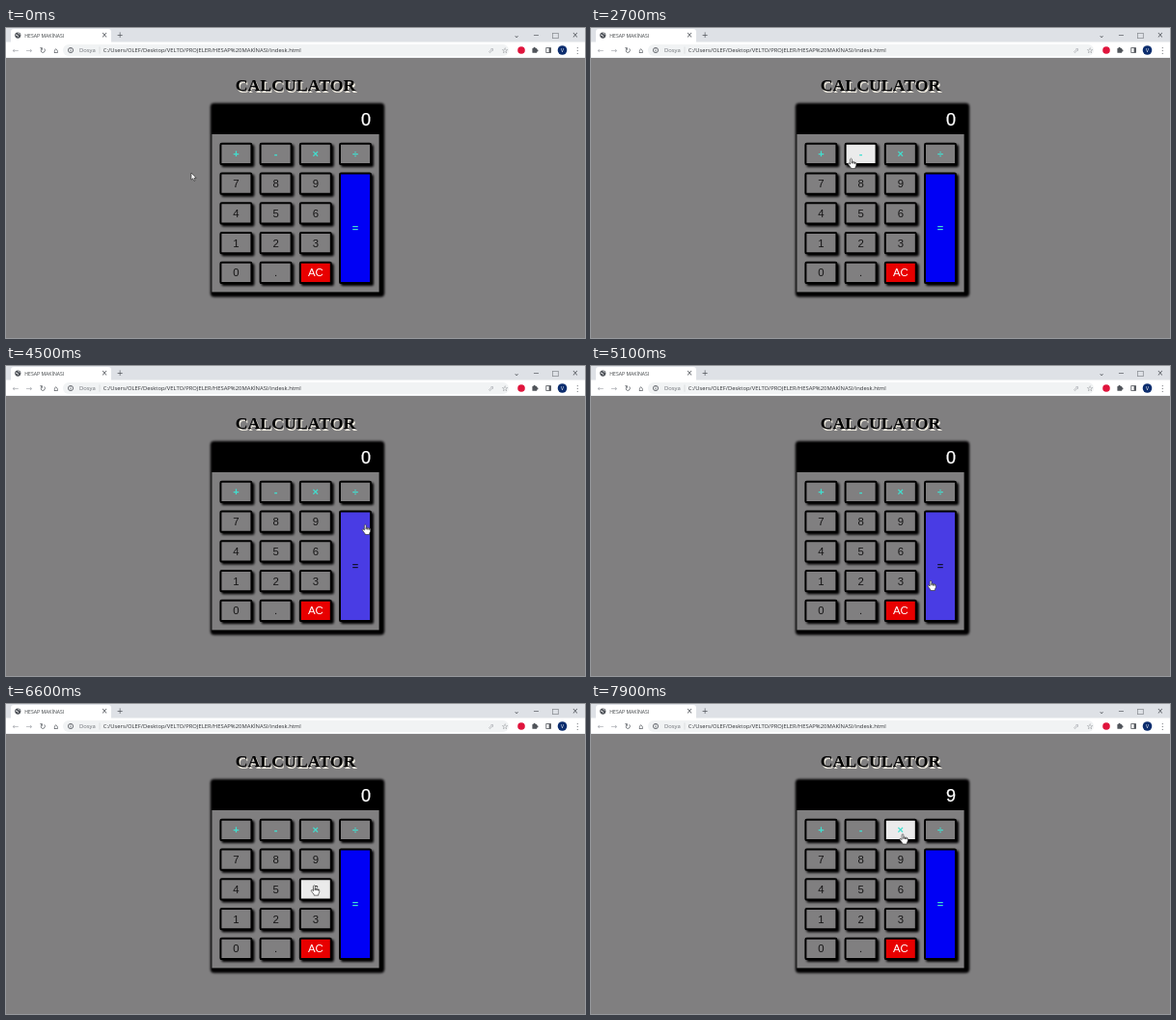
Write an HTML page that moves like this. It is 600 px wide and 321 px high and loops after 8000 ms.

```html
<!DOCTYPE html>
<html lang="tr">
<head>
<meta charset="utf-8">
<title>Calculator</title>
<style>
  html, body { margin: 0; width: 100%; height: 100%; overflow: hidden; background: #807f80; }
  svg { display: block; }
  text { font-family: "Liberation Sans", Arial, sans-serif; }
  .ui text { font: 5.87px "Open Sans", sans-serif; fill: #3c4043; }
  .ui .icon { font: 8px "DejaVu Sans", sans-serif; fill: #50545a; text-anchor: middle; dominant-baseline: central; }
  .ui .pale { fill: #a8abb0; }
  .key rect { stroke: #000; stroke-width: 2; filter: drop-shadow(2.8px 2.8px 1.1px #000); }
  .key text { font-size: 11.4px; text-anchor: middle; }
  .title { font: bold 17.75px "Liberation Serif", serif; text-anchor: middle; text-shadow: 1.2px 1.2px .4px #f0ece0; }
</style>
</head>
<body>
<svg width="600" height="321" viewBox="0 0 600 321">
  <rect width="600" height="321" fill="#807f80"/>
  <g class="ui" id="browser">
    <rect width="600" height="31" fill="#dee1e6"/>
    <rect y="14.5" width="600" height="16" fill="#fff"/>
    <rect x="5" y="1" width="104" height="20" rx="3" fill="#fff"/>
    <circle cx="12.3" cy="7.6" r="3.1" fill="#50545a"/>
    <path d="M10 7l2 .6 .6 1.6M12.4 5.2l2 1.2" fill="none" stroke="#fff" stroke-width=".8"/>
    <text x="19.3" y="9.7" style="font-size:5.15px">HESAP MAKİNASI</text>
    <rect x="59" y="17" width="462" height="12" rx="6" fill="#f1f3f4"/>
    <text x="76" y="25.2" style="fill:#6a6e73">Dosya</text>
    <text x="100.8" y="25.2" style="fill:#303236">C:/Users/OLEF/Desktop/VELTO/PROJELER/HESAP%20MAKİNASI/indesk.html</text>
    <path d="M97 19.5v7" stroke="#c4c7ca" stroke-width=".5"/>
    <circle cx="67" cy="23" r="2.6" fill="none" stroke="#50545a" stroke-width=".8"/>
    <path d="M67 22.6v1.8m0-3.1v.7" stroke="#50545a" stroke-width=".8"/>
    <circle cx="534" cy="23" r="3.8" fill="#e0143c"/>
    <rect x="545.4" y="21" width="4.8" height="4.8" rx=".6" fill="#50545a"/>
    <circle cx="547.6" cy="20.8" r="1.1" fill="#50545a"/>
    <circle cx="550.4" cy="23.4" r="1.1" fill="#50545a"/>
    <rect x="559.8" y="20.6" width="4.8" height="4.8" fill="none" stroke="#50545a" stroke-width=".8"/>
    <rect x="562.6" y="20.6" width="2" height="4.8" fill="#50545a"/>
    <circle cx="576.5" cy="23" r="4.8" fill="#0c2d6e"/>
    <text x="576.5" y="25" text-anchor="middle" style="fill:#fff;font-size:5px">V</text>
  </g>
  <text class="title" x="300" y="65.4">CALCULATOR</text>
  <rect x="211.8" y="77.8" width="180.4" height="200.8" rx="4" style="filter:blur(.9px)"/>
  <rect x="213.4" y="110" width="173.2" height="163.4" fill="#807f80"/>
  <text id="display" x="378" y="100.8" text-anchor="end" fill="#fff" stroke="#fff" stroke-width=".25" font-size="18">0</text>
  <g id="keys"></g>
  <path id="arrow" d="M0 0V7.2L1.7 5.7 2.9 8.3 4 7.8 2.9 5.3H5.1Z" fill="#fff" stroke="#000" stroke-width=".5"/>
  <path id="hand" d="M-.9 6V.8Q0-.5 .9 .8V5.2 3.4Q2 2.8 2.5 3.8V5.4 3.8Q3.5 3.2 4 4.2V5.6 4.2Q5.3 3.8 5.4 5.2V7.2L4.4 9.3V10.5H-.2V9.7L-3 5.9Q-3.2 4.7-2.1 4.9Z"
    fill="#fff" stroke="#222" stroke-width=".6"/>
</svg>
<script>
const LOOP = 8000, STEP = 100, PITCH_X = 41.2, PITCH_Y = 30.75;
const $ = id => document.getElementById(id);

function add(parent, tag, attrs, content = "") {
  const el = document.createElementNS("http://www.w3.org/2000/svg", tag);
  for (const name in attrs) el.setAttribute(name, attrs[name]);
  el.textContent = content;
  return parent.appendChild(el);
}

function icon(glyph, x, y, pale) {
  add($("browser"), "text", { class: pale ? "icon pale" : "icon", x, y }, glyph);
}

[..."←→↻⌂"].forEach((glyph, i) => icon(glyph, 10 + i * 14, 23, i < 2));
[..."⇗☆"].forEach((glyph, i) => icon(glyph, 502.5 + i * 14.5, 23, i < 1));
[..."⌄−□×"].forEach((glyph, i) => icon(glyph, 529 + i * 20.3, 7, false));
icon("×", 102, 7.4);
icon("+", 118.2, 7.4);
icon("⋮", 592, 23);

function makeKey(label, col, row, opts = {}) {
  const { fill = "#807f80", hover = "#ebebeb", ink = "#161616", hoverInk = ink, span = 1, op } = opts;
  const x = 222.4 + col * PITCH_X, y = 119.8 + row * PITCH_Y;
  const width = 32, height = 21.3 + (span - 1) * PITCH_Y;
  const group = add($("keys"), "g", { class: "key" });
  const face = add(group, "rect", { x, y, width, height, rx: 1.2 });
  const text = add(group, "text", { x: x + width / 2, y: y + height / 2 + 4 }, label);
  if (op) text.style.font = "bold 11px 'Liberation Sans', sans-serif";
  return {
    contains: (px, py) => px >= x - 1 && px <= x + width + 1 && py >= y - 1 && py <= y + height + 1,
    paint(over) {
      face.setAttribute("fill", over ? hover : fill);
      text.setAttribute("fill", over ? hoverInk : ink);
    }
  };
}

const cyan = "#40e0d0";
const keys = [
  ...["+-×÷", "789", "456", "123", "0."].flatMap((line, row) =>
    [...line].map((label, col) => makeKey(label, col, row, row ? {} : { ink: cyan, op: true }))),
  makeKey("AC", 2, 4, { fill: "#e80000", ink: "#fff" }),
  makeKey("=", 3, 1, { fill: "#0000f5", hover: "#493ce4", ink: cyan, hoverInk: "#101030", span: 4, op: true })
];

// Straight pointer moves; it rests between them
const origin = { x: 192, y: 150 };
const moves = [
  [0, 400, 193, 143], [1800, 1900, 204, 142], [1900, 2300, 238, 132],
  [2400, 2700, 269.5, 135], [2700, 3300, 294, 136], [3300, 3600, 325, 131],
  [3900, 4000, 360, 126], [4000, 4100, 361, 131], [4200, 4600, 376, 175],
  [4600, 5100, 352, 222], [5100, 6000, 316, 221], [6100, 7000, 322, 161],
  [7000, 7100, 325, 162], [7500, 7900, 323, 134.5]
].map(([from, to, x, y]) => ({ from, to, x, y }));

function pointerAt(t) {
  let { x, y } = origin;
  for (const move of moves) {
    const k = Math.min(1, Math.max(0, (t - move.from) / (move.to - move.from)));
    x += (move.x - x) * k;
    y += (move.y - y) * k;
  }
  return [x, y];
}

function draw(now) {
  const t = Math.floor(now % LOOP / STEP) * STEP;
  const [x, y] = pointerAt(t);
  const over = keys.find(key => key.contains(x, y));
  keys.forEach(key => key.paint(key === over));
  $("display").textContent = t < 7400 ? "0" : "9";
  for (const id of ["arrow", "hand"]) {
    $(id).setAttribute("transform", `translate(${x} ${y})`);
    $(id).style.display = (id === "hand") === !!over ? "" : "none";
  }
}

const start = performance.now();
function tick() {
  draw(performance.now() - start);
  requestAnimationFrame(tick);
}
tick();
</script>
</body>
</html>
```
